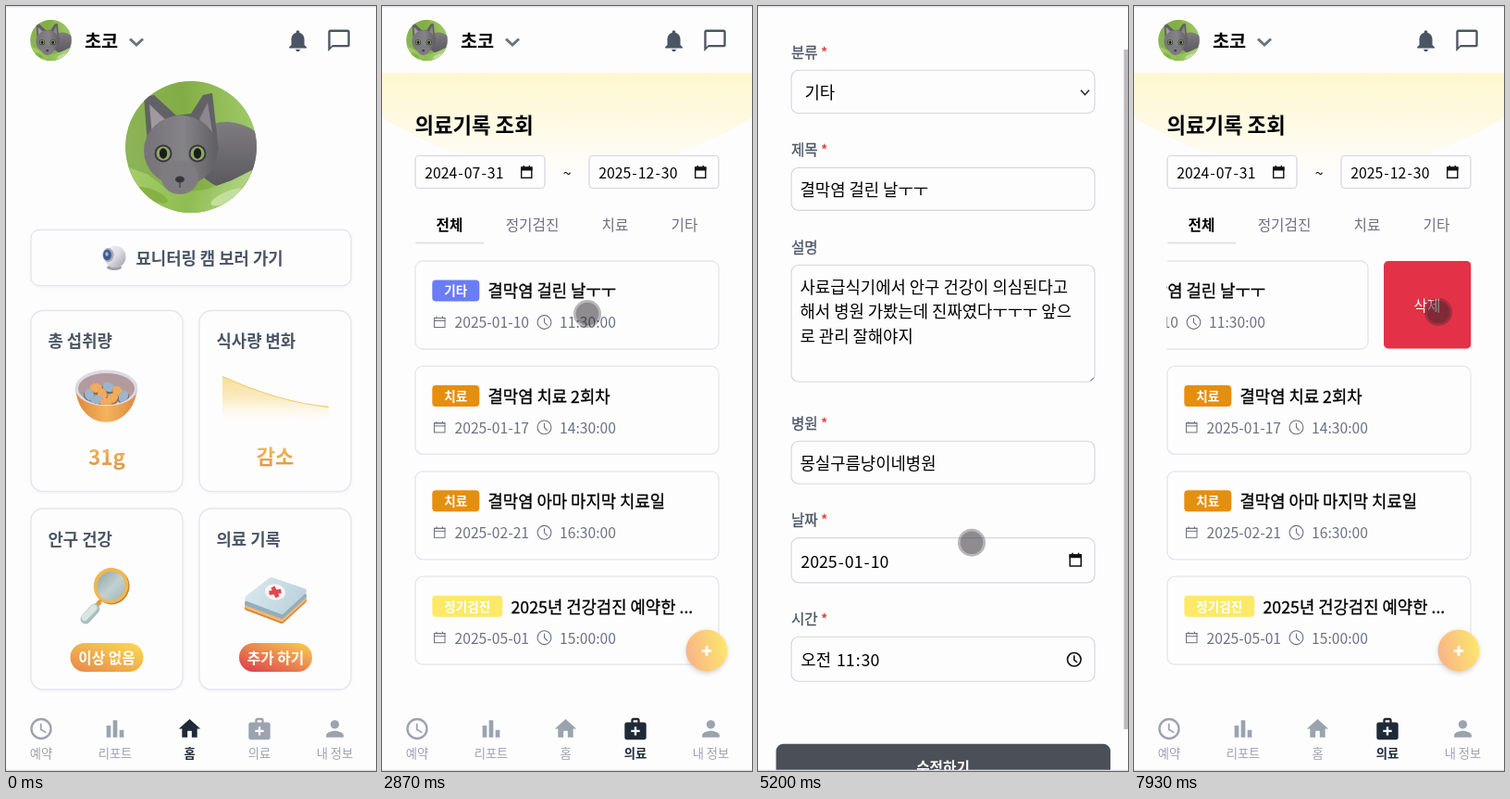
An HTML page with a canvas for the animation above (8 s loop, 400 px wide and 825 px high).

```html
<!DOCTYPE html>
<html lang="ko">
<head>
<meta charset="utf-8">
<title>의료기록</title>
<style>
html, body { margin: 0; width: 100%; height: 100%; overflow: hidden; background: #fefdfe; }
canvas { display: block; width: 400px; height: 825px; }
</style>
</head>
<body>
<canvas id="stage"></canvas>
<script>
const W = 400, H = 825, LOOP = 8000;
const cv = document.getElementById('stage');
const c = cv.getContext('2d');
const dpr = window.devicePixelRatio || 1;
cv.width = W * dpr;
cv.height = H * dpr;

const FONT = '"Noto Sans CJK KR", "Noto Sans KR", "Noto Sans", sans-serif';
const BG = '#fefdfe', SLATE = '#4b5563', GRAY = '#6b7280', PALE = '#9ca3af', DARK = '#1f2937';
const MID = 17.75, BODY = 15.7;

const ICON = {
  bell: 'M12 22c1.1 0 2-.9 2-2h-4c0 1.1.89 2 2 2zm6-6v-5c0-3.07-1.64-5.64-4.5-6.32V4c0-.83-.67-1.5-1.5-1.5s-1.5.67-1.5 1.5v.68C7.63 5.36 6 7.92 6 11v5l-2 2v1h16v-1l-2-2z',
  chat: 'M20 2H4c-1.1 0-2 .9-2 2v18l4-4h14c1.1 0 2-.9 2-2V4c0-1.1-.9-2-2-2zm0 14H6l-2 2V4h16v12z',
  clock: 'M12 2a10 10 0 1 0 0 20a10 10 0 1 0 0-20zM12 20a8 8 0 1 1 0-16a8 8 0 1 1 0 16zM12.5 7H11v6l5.25 3.15.75-1.23-4.5-2.67z',
  bars: 'M4 9h4v11H4zM16 13h4v7h-4zM10 4h4v16h-4z',
  home: 'M10 20v-6h4v6h5v-8h3L12 3 2 12h3v8z',
  kit: 'M20 6h-4V4c0-1.1-.9-2-2-2h-4c-1.1 0-2 .9-2 2v2H4c-1.1 0-2 .9-2 2v12c0 1.1.9 2 2 2h16c1.1 0 2-.9 2-2V8c0-1.1-.9-2-2-2zM10 4h4v2h-4V4zm6 11h-3v3h-2v-3H8v-2h3v-3h2v3h3v2z',
  person: 'M12 12c2.21 0 4-1.79 4-4s-1.79-4-4-4-4 1.79-4 4 1.79 4 4 4zm0 2c-2.67 0-8 1.34-8 4v2h16v-2c0-2.66-5.33-4-8-4z'
};
for (const k in ICON) ICON[k] = new Path2D(ICON[k]);

// ---------- helpers ----------
function icon(name, cx, cy, color, scale = 1.17) {
  c.save();
  c.translate(cx, cy);
  c.scale(scale, scale);
  c.translate(-12, -12);
  c.fillStyle = color;
  c.fill(ICON[name], 'evenodd');
  c.restore();
}

// y is the visual middle of the line
function text(s, x, y, size, weight = 400, color = '#000', align = 'left') {
  c.font = `${weight} ${size}px ${FONT}`;
  c.textAlign = align;
  c.fillStyle = color;
  c.fillText(s, x, y + size * 0.38);
  if (weight === 500) {
    c.lineWidth = 0.3;
    c.strokeStyle = color;
    c.strokeText(s, x, y + size * 0.38);
  }
}

// editable date and time parts have 1px of padding on both sides
function fields(s, x, y, size) {
  for (const part of s.match(/[0-9가-힣]+|[^0-9가-힣]/g)) {
    const pad = /[0-9가-힣]/.test(part) ? 1 : 0;
    text(part, x + pad, y, size);
    x += c.measureText(part).width + 2 * pad;
  }
}

function box(x, y, w, h, r, fill, stroke, lw = 1) {
  c.beginPath();
  c.roundRect(x, y, w, h, r);
  if (fill) { c.fillStyle = fill; c.fill(); }
  if (stroke) { c.strokeStyle = stroke; c.lineWidth = lw; c.stroke(); }
}

function oval(x, y, rx, ry, fill, rot = 0) {
  c.beginPath();
  c.ellipse(x, y, rx, ry, rot, 0, Math.PI * 2);
  c.fillStyle = fill;
  c.fill();
}

function poly(points, fill) {
  c.beginPath();
  for (const [x, y] of points) c.lineTo(x, y);
  c.closePath();
  c.fillStyle = fill;
  c.fill();
}

function line(points, color, lw) {
  c.beginPath();
  for (const [x, y] of points) c.lineTo(x, y);
  c.strokeStyle = color;
  c.lineWidth = lw;
  c.stroke();
}

function grad(x0, y0, x1, y1, ...stops) {
  const g = c.createLinearGradient(x0, y0, x1, y1);
  stops.forEach((s, i) => g.addColorStop(i / (stops.length - 1), s));
  return g;
}

function shadow(color, blur, dy) {
  c.shadowColor = color;
  c.shadowBlur = blur * dpr;
  c.shadowOffsetY = dy * dpr;
}

function calendar(x, y, w, h, color, lw, top) {
  c.strokeStyle = color;
  c.fillStyle = color;
  c.lineWidth = lw;
  c.strokeRect(x + lw / 2, y + 1.5 + lw / 2, w - lw, h - 1.5 - lw);
  c.fillRect(x, y + 1.5, w, top);
  c.fillRect(x + w * 0.2, y, lw, 2);
  c.fillRect(x + w * 0.8 - lw, y, lw, 2);
  if (top < 2) c.fillRect(x, y + 4.5, w, lw);
}

function dial(x, y, r, color, lw) {
  c.beginPath();
  c.arc(x, y, r, 0, Math.PI * 2);
  c.strokeStyle = color;
  c.lineWidth = lw;
  c.stroke();
  line([[x, y - r * 0.6], [x, y + 0.3], [x + r * 0.45, y + r * 0.45]], color, lw);
}

// ---------- shared pieces ----------
function cat(cx, cy, r) {
  c.save();
  c.beginPath();
  c.arc(cx, cy, r, 0, Math.PI * 2);
  c.clip();
  c.translate(cx, cy);
  c.scale(r / 71, r / 71);
  c.fillStyle = grad(-70, -20, 60, -40, '#8cb356', '#82ad45', '#9cc765');
  c.fillRect(-72, -72, 144, 144);
  oval(44, 10, 44, 36, grad(0, -24, 0, 44, '#7d7b80', '#59585c'), 0.35);
  poly([[-46, 10], [-51, -54], [-40, -56], [-16, -34], [0, -36], [13, -56], [23, -58], [30, 4]], '#626165');
  poly([[-42, -12], [-45, -46], [-24, -26]], '#a09a9f');
  poly([[9, -30], [18, -48], [24, -10]], '#8d878d');
  oval(-11, 4, 40, 38, grad(-45, 0, 30, 0, '#77757a', '#858388', '#5e5d61'));
  poly([[-72, 20], [-46, 30], [-20, 50], [16, 46], [44, 36], [72, 22], [72, 72], [-72, 72]],
       grad(-60, 30, 60, 60, '#a3cb66', '#8fbd50', '#b3d586'));
  oval(-12, 33, 20, 18, '#7e7c81');
  oval(40, 54, 20, 6, '#c3dfa0', -0.4);
  oval(-42, 52, 18, 6, '#86b245', 0.4);
  for (const x of [-30, 7]) {
    oval(x, 7, 9.5, 9.5, '#39393b');
    oval(x, 7, 7.5, 7.5, '#8fa766');
    oval(x, 7, 4.2, 5.8, '#1b1d1b');
  }
  oval(-12, 35, 5, 3.5, '#37353a');
  line([[-12, 38], [-12, 44]], '#4c4a4f', 1.5);
  c.restore();
}

function header(pet) {
  const h = pet ? 72 : 55, y = pet ? 37.3 : 28;
  c.fillStyle = BG;
  c.fillRect(0, 0, W, h);
  if (pet) {
    cat(48.5, 37, 22.3);
    text('초코', 85, 38, 19.7, 700);
    line([[134, 35.5], [141, 42], [148, 35.5]], GRAY, 3);
  }
  icon('bell', 315.5, y, SLATE);
  icon('chat', 360, y, SLATE);
}

function nav(active) {
  const tabs = [['clock', '예약', 38], ['bars', '리포트', 118], ['home', '홈', 198.5],
                ['kit', '의료', 274], ['person', '내 정보', 355.5]];
  tabs.forEach(([name, label, x], i) => {
    const on = i === active;
    icon(name, x, 779.5, on ? DARK : PALE);
    text(label, x, 806, 13.3, on ? 700 : 400, on ? DARK : PALE, 'center');
  });
}

function card(x, y, w, h, r) {
  c.save();
  shadow('rgba(90,90,130,.10)', 4, 1);
  box(x, y, w, h, r, BG);
  c.restore();
  box(x, y, w, h, r, null, '#e6e5ee', 1.3);
}

// ---------- home ----------
function webcam() {
  oval(117, 282, 8, 3, '#9d9ca8');
  oval(118, 270.5, 11.5, 12, grad(106, 260, 130, 282, '#f3f2f6', '#dddce3', '#9c9ba8'));
  oval(110.5, 268.5, 6, 7.5, '#a2a8bd');
  oval(109.5, 268.5, 4.4, 5.7, '#46588a');
  oval(109, 267.5, 1.7, 2.2, '#9cbbe4');
}

function bowl() {
  c.beginPath();
  c.moveTo(75, 412);
  c.bezierCurveTo(79, 461, 137, 461, 142, 412);
  c.fillStyle = grad(76, 0, 141, 0, '#e08a3c', '#f4b35d', '#dc8b40');
  c.fill();
  oval(108.5, 412, 33.8, 19.5, '#dcd9e2');
  oval(108.5, 412.5, 30.5, 16.5, '#b39a9c');
  c.save();
  c.beginPath();
  c.ellipse(108.5, 412.5, 30.5, 17.5, 0, 0, Math.PI * 2);
  c.clip();
  const pills = [[97, 412], [111, 411], [121, 416], [90, 419], [104, 419], [127, 421], [115, 423], [98, 425], [108, 428]];
  pills.forEach(([x, y], i) => {
    const blue = i % 2, tilt = i * 0.4;
    oval(x, y + 1.3, 7.3, 5.6, blue ? '#55687f' : '#a8642c', tilt);
    oval(x, y, 6.8, 5, blue ? '#9db4ca' : '#f0ab5c', tilt);
  });
  c.restore();
}

function chart() {
  const curve = () => {
    c.beginPath();
    c.moveTo(234, 399.5);
    c.bezierCurveTo(266, 414, 304, 428, 349, 432.5);
  };
  curve();
  c.lineTo(349, 448);
  c.lineTo(234, 448);
  c.fillStyle = grad(0, 399, 0, 448, '#f8dd96', '#fbebc3', 'rgba(254,249,236,0)');
  c.fill();
  curve();
  c.strokeStyle = '#f0cd73';
  c.lineWidth = 1.3;
  c.stroke();
}

function lens() {
  c.lineCap = 'round';
  line([[101, 643], [96, 649]], '#dd9c3e', 5);
  line([[96, 650], [86, 661]], '#a9bfbf', 11);
  line([[95, 649], [85, 659.5]], '#d6e6e3', 7);
  c.lineCap = 'butt';
  oval(114.5, 626, 19, 19.5, '#bf8430', 0.5);
  oval(113.5, 625, 18.7, 19.3, '#f0b750', 0.5);
  oval(113.5, 625.5, 15, 16, grad(100, 612, 128, 642, '#93a8ad', '#c2d0cf', '#a0b4b8'), 0.5);
}

function aidKit() {
  c.lineJoin = 'round';
  const slab = (dy, fill) => {
    const p = [[261, 639 + dy], [287, 619 + dy], [322, 631 + dy], [298, 653 + dy]];
    poly(p, fill);
    c.strokeStyle = fill;
    c.lineWidth = 6;
    c.stroke();
  };
  slab(10, '#d9843a');
  slab(8, '#f3b974');
  slab(5, '#93aebb');
  slab(0, grad(262, 620, 320, 655, '#d9e8ee', '#b9d0da'));
  c.lineJoin = 'miter';
  oval(291, 632, 11, 8.5, '#f8f6f7', 0.15);
  line([[284.5, 633], [297.5, 631]], '#e0474c', 4.5);
  line([[288.5, 626.5], [293.5, 637.5]], '#e0474c', 4.5);
}

// gradient runs from the bottom left to the top right corner
function pill(x, label, from, to) {
  const cx = x + 39.5, cy = 702.5;
  box(x, 687, 79, 31, 15.5, grad(cx - 10.5, cy + 26.8, cx + 10.5, cy - 26.8, from, to));
  text(label, cx, 703, BODY, 700, '#fff', 'center');
}

function home() {
  header(true);
  cat(200, 152, 71);
  card(27, 241.5, 346, 60, 9);
  webcam();
  text('묘니터링 캠 보러 가기', 140.5, 272, MID, 700, SLATE);
  const titles = ['총 섭취량', '식사량 변화', '안구 건강', '의료 기록'];
  titles.forEach((s, i) => {
    const x = 27 + 182 * (i % 2), y = i < 2 ? 328.5 : 542;
    card(x, y, 164, 195, 13);
    text(s, x + 18.5, y + 33, MID, 700, SLATE);
  });
  bowl();
  chart();
  lens();
  aidKit();
  const gold = grad(0, 474, 0, 498, '#f0bd5b', '#df9549');
  text('31g', 109, 486.5, 22.5, 700, gold, 'center');
  text('감소', 291, 486, 22, 700, gold, 'center');
  pill(69.5, '이상 없음', '#e8864a', '#fbdc50');
  pill(252, '추가 하기', '#da3a4e', '#fbd04e');
  nav(2);
}

// ---------- record list ----------
const RECORDS = [
  ['기타', '#6b7cf7', '결막염 걸린 날ㅜㅜ', '2025-01-10', '11:30:00'],
  ['치료', '#e58f0f', '결막염 치료 2회차', '2025-01-17', '14:30:00'],
  ['치료', '#e58f0f', '결막염 아마 마지막 치료일', '2025-02-21', '16:30:00'],
  ['정기검진', '#fde968', '2025년 건강검진 예약한 ...', '2025-05-01', '15:00:00']
];

function record([tag, color, title, day, time], i, shift) {
  const y = 275 + 113.4 * i;
  c.save();
  if (shift) {
    c.beginPath();
    c.rect(35.5, y - 2, 329, 100);
    c.clip();
    c.translate(shift, 0);
    box(381, y, 94.5, 94.5, 5, '#e33147');
    text('삭제', 428, y + 48, BODY, 400, '#fff', 'center');
  }
  box(36, y, 328, 95, 8, BG, '#e4e5eb', 1.3);
  const w = tag.length > 2 ? 76 : 51;
  box(54.3, y + 20.5, w, 23, 4, color);
  text(tag, 54.3 + w / 2, y + 32.3, 13.6, 700, '#fff', 'center');
  text(title, 54.3 + w + 9.2, y + 32.7, MID, 500);
  calendar(56, y + 59.5, 12.5, 12.5, GRAY, 1, 1);
  text(day, 78.5, y + 66.5, BODY, 400, GRAY);
  dial(175.5, y + 66, 7.4, GRAY, 1.1);
  text(time, 192, y + 66.5, BODY, 400, GRAY);
  c.restore();
}

function list(loaded, shift) {
  c.beginPath();
  c.moveTo(0, 0);
  c.lineTo(0, 121);
  c.quadraticCurveTo(200, 240, 400, 121);
  c.lineTo(400, 0);
  c.fillStyle = grad(0, 55, 0, 182, '#fef6c8', '#fefae0', BG);
  c.fill();
  header(loaded);
  text('의료기록 조회', 35.5, 129, 22.3, 700);
  [['2024-07-31', 36], ['2025-12-30', 224]].forEach(([s, x]) => {
    box(x, 161.5, 140, 35, 4, BG, '#d3d5dc', 1.2);
    fields(s, x + 9.3, 180, 15.8);
    calendar(x + 114, 172, 12.5, 14, '#111', 1.4, 4);
  });
  text('~', 200, 180, BODY, 400, '#000', 'center');
  [['전체', 73], ['정기검진', 162.5], ['치료', 252], ['기타', 327]].forEach(([s, x], i) =>
    text(s, x, 236, BODY, i ? 400 : 700, i ? GRAY : '#000', 'center'));
  c.fillStyle = '#e2e3ea';
  c.fillRect(36, 254.5, 74.5, 2);
  if (loaded) RECORDS.forEach((r, i) => record(r, i, i ? 0 : shift));
  else text('로딩 중...', 200, 290, MID, 400, '#000', 'center');
  c.save();
  shadow('rgba(0,0,0,.18)', 5, 2);
  oval(351, 695, 22.4, 22.4, grad(329, 700, 373, 690, '#f8b488', '#fee66c'));
  c.restore();
  line([[345.7, 695.5], [356.3, 695.5]], '#fff', 2.8);
  line([[351, 690.2], [351, 700.8]], '#fff', 2.8);
  nav(3);
}

// ---------- edit form ----------
const FIELDS = [
  ['분류', 122, 46.5], ['제목', 227.2, 46], ['설명', 332, 126],
  ['병원', 522, 46], ['날짜', 626.3, 48.3], ['시간', 733, 48]
];

function form(scroll, barAlpha) {
  c.save();
  c.translate(0, -scroll);
  line([[35.5, 29.5], [29, 37], [35.5, 44.5]], GRAY, 2.4);
  text('의료기록 수정', 209.5, 36, BODY, 700, '#000', 'center');
  for (const [label, y, h] of FIELDS) {
    text(label, 36, y - 19.5, 15.6, 500, SLATE);
    if (label !== '설명') text('*', 68, y - 19, 15.6, 500, '#e23b3b');
    box(36, y, 328, h, 8, BG, '#d4d6de', 1.2);
  }
  text('기타', 50.5, 146.5, MID);
  line([[349, 143.5], [353.5, 148.5], [358, 143.5]], '#222', 1.5);
  text('결막염 걸린 날ㅜㅜ', 45.5, 251, MID);
  ['사료급식기에서 안구 건강이 의심된다고', '해서 병원 가봤는데 진짜였다ㅜㅜㅜ 앞으', '로 관리 잘해야지'].forEach((s, i) =>
    text(s, 45.5, 356 + 26.5 * i, MID));
  line([[359.5, 457], [362.5, 454]], '#555', 1);
  text('몽실구름냥이네병원', 45.5, 546, MID);
  fields('2025-01-10', 45.3, 652, MID);
  calendar(336.5, 642.5, 13.5, 15, '#111', 1.5, 4);
  fields('오전 11:30', 45.3, 758, MID);
  dial(341.8, 757.5, 7.3, '#111', 1.6);
  box(19.5, 848.5, 361.5, 50, 8, '#4b4f57');
  text('수정하기', 200, 873.5, BODY, 700, '#fff', 'center');
  c.restore();
  if (barAlpha > 0) {
    c.fillStyle = `rgba(110,108,112,${0.45 * barAlpha})`;
    c.fillRect(395.5, scroll * 0.89, 4.5, 733);
  }
}

// ---------- pointer path: time, x, y ----------
const PATH = [
  [70, 330, 690], [400, 274, 782], [730, 274, 782], [1330, 302, 644], [1530, 302, 652],
  [1800, 302, 652], [2250, 192, 420], [2470, 219, 341], [2730, 219, 341], [2870, 222, 332],
  [3270, 222, 332], [4070, 231, 631.5], [4276, 231, 631.5], [4850, 231, 528.5],
  [4960, 231, 528.5], [5450, 231, 631.5], [5870, 60, 121], [6130, 36, 38], [6330, 36, 38],
  [7130, 327, 359], [7200, 327, 356], [7560, 212, 342], [7930, 329, 330], [8000, 329, 330]
];

function pointer(t) {
  const i = PATH.findIndex(k => k[0] > t);
  if (i < 1) return null;
  const [t0, x0, y0] = PATH[i - 1], [t1, x1, y1] = PATH[i];
  const p = (t - t0) / (t1 - t0), e = p * p * (3 - 2 * p);
  return [x0 + (x1 - x0) * e, y0 + (y1 - y0) * e];
}

function draw(t) {
  const at = pointer(t);
  c.setTransform(dpr, 0, 0, dpr, 0, 0);
  c.fillStyle = BG;
  c.fillRect(0, 0, W, H);

  if (t < 730) home();
  else if (t < 1470) list(false, 0);
  else if (t < 3330) list(true, 0);
  else if (t < 6400) {
    const scroll = t > 4276 && t < 5450 ? 631.5 - at[1] : 0;
    const bar = t < 4276 ? 0 : Math.min(1, Math.max(0, (6000 - t) / 300));
    form(scroll, bar);
  } else if (t < 6900) list(false, 0);
  else {
    const drag = t < 7200 ? 0 : t < 7560 ? Math.max(-111, at[0] - 327) : -111;
    list(true, drag);
  }

  if (at) {
    oval(at[0], at[1], 15, 15, 'rgba(40,38,42,.33)');
    oval(at[0], at[1], 12.3, 12.3, 'rgba(40,38,42,.29)');
  }
  c.fillStyle = '#dcdbe0';
  c.fillRect(0, 0, W, 1.3);
  c.fillRect(0, 823.7, W, 1.3);
}

const start = performance.now();
function tick() {
  draw((performance.now() - start) % LOOP);
  requestAnimationFrame(tick);
}
tick();
</script>
</body>
</html>
```
